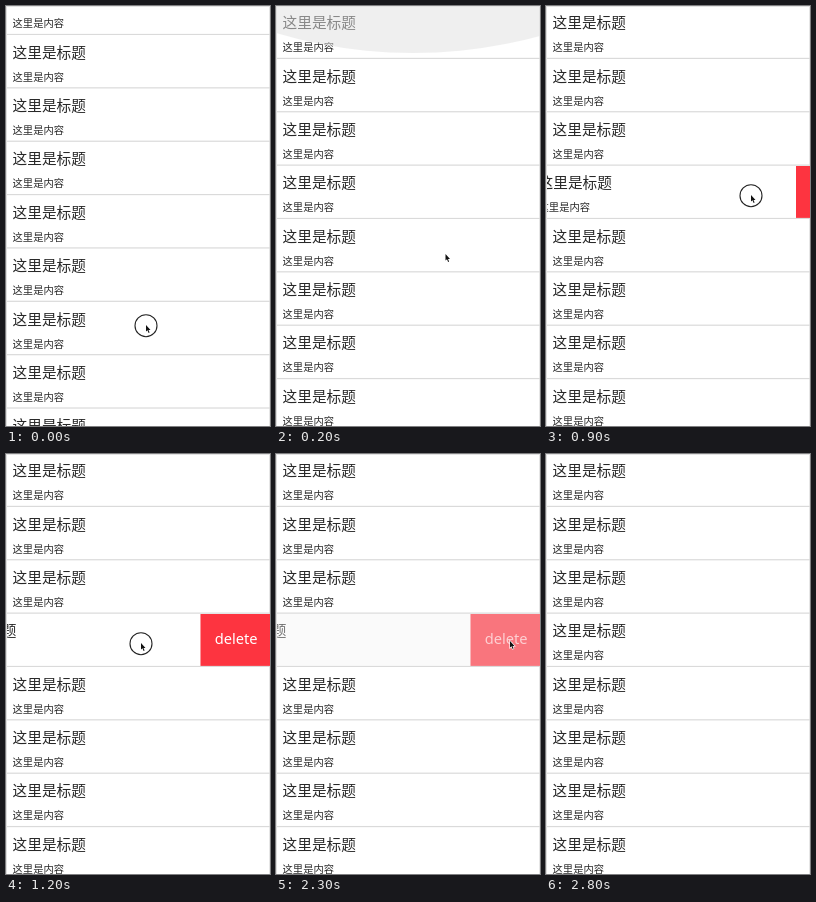
Animation of 264 by 420 pixels, one loop 3 s. Source, as an HTML page with a canvas:

```html
<!DOCTYPE html>
<html lang="zh-CN">
<head>
<meta charset="utf-8">
<style>
  html, body { margin: 0; width: 100%; height: 100%; overflow: hidden; background: #fff; }
  canvas { display: block; }
</style>
</head>
<body>
<canvas id="stage" width="264" height="420"></canvas>
<script>
const W = 264, H = 420, LOOP = 3000, STEP = 100;
const PITCH = 53.36, SWIPED = 3, BUTTON = 69.5;
const CJK = '"Noto Sans CJK SC", "Noto Sans CJK", sans-serif';
const ctx = document.getElementById('stage').getContext('2d');
const arrow = new Path2D('M0 0V6.6L1.5 5.3 2.6 7.9 3.6 7.4 2.5 4.9H4.5Z');

const clamp = (v, lo = 0, hi = 1) => Math.min(hi, Math.max(lo, v));
const smooth = p => (1 - Math.cos(Math.PI * clamp(p))) / 2;
const within = (t, from, to) => t >= from && t < to;

// Pointer path: time, x, y
const pointerPath = [
  [0, 140, 319], [100, 156, 285], [200, 169.5, 248], [400, 198, 212],
  [700, 225, 189], [800, 225, 189], [1000, 185, 189], [1200, 135, 189],
  [1300, 135, 189], [1800, 227, 188], [2200, 234, 187], [2300, 234, 187],
  [2600, 268, 196]
];

function pointerAt(t) {
  const i = pointerPath.findIndex(p => p[0] > t);
  if (i < 0) return null;
  const [a, b] = [pointerPath[i - 1], pointerPath[i]];
  const p = (t - a[0]) / (b[0] - a[0]);
  return { x: a[1] + (b[1] - a[1]) * p, y: a[2] + (b[2] - a[2]) * p };
}

function rect(x, y, w, h, color) {
  ctx.fillStyle = color;
  ctx.fillRect(x, y, w, h);
}

function label(text, x, y, font, color = '#282828') {
  ctx.font = font;
  ctx.fillStyle = color;
  ctx.fillText(text, x, y);
}

function drawRow(y, swipe, alpha) {
  const top = Math.round(y), bottom = Math.round(y + PITCH), edge = W - swipe;
  ctx.globalAlpha = alpha;
  rect(0, top, edge, bottom - top, '#fff');
  label('这里是标题', 6.6 - swipe, y + 22.25, '14.67px ' + CJK);
  label('这里是内容', 6.6 - swipe, y + 45.3, '10.27px ' + CJK);
  if (swipe > 0) {
    rect(edge, top, swipe, bottom - top, '#fd3440');
    label('delete', edge + 14.2, y + 29.8, '14.67px "Noto Sans", sans-serif', '#fff');
  } else {
    rect(W - 1, top, 1, bottom - top, '#e6e6e6');
  }
  ctx.globalAlpha = 1;
  rect(0, y + 51.8, W, 1.2, '#dadada');
}

function drawGlow(t) {
  if (!within(t, 100, 700)) return;
  const strength = t < 200 ? 0.7 : (1 - (t - 200) / 500) ** 2;
  const radius = 480;
  ctx.fillStyle = `rgba(224, 224, 224, ${0.52 * strength})`;
  ctx.beginPath();
  ctx.arc(137, 47 * strength - radius, radius, 0, Math.PI * 2);
  ctx.fill();
}

function drawPointer({ x, y }, pressed) {
  if (pressed) {
    ctx.beginPath();
    ctx.arc(x, y + 0.7, 11, 0, Math.PI * 2);
    ctx.strokeStyle = '#222';
    ctx.lineWidth = 1.1;
    ctx.stroke();
  }
  ctx.save();
  ctx.translate(x, y);
  ctx.strokeStyle = '#fff';
  ctx.lineWidth = 1.2;
  ctx.stroke(arrow);
  ctx.fillStyle = '#111';
  ctx.fill(arrow);
  ctx.restore();
}

function draw(t) {
  const pointer = pointerAt(t);
  const scroll = t < 100 ? 23.9 : 0;
  const swipe = t < 800 ? 0 : t < 1300 ? clamp(225 - pointer.x - 6, 0, BUTTON) : BUTTON;
  const alpha = 1 - smooth((t - 2252) / 120);
  const collapse = smooth((t - 2372) / 250) * PITCH;

  rect(0, 0, W, H, '#f2f2f2');
  if (alpha > 0) drawRow(SWIPED * PITCH - scroll, swipe, alpha);
  for (let i = 0; i < 10; i++) {
    if (i !== SWIPED) drawRow(i * PITCH - scroll - (i > SWIPED ? collapse : 0), 0, 1);
  }
  drawGlow(t);
  rect(0, 0, W, 1, '#e2e2e2');
  rect(0, 0, 1, H, '#dedede');

  const pressed = t < 100 || within(t, 800, 1300) || within(t, 2200, 2300);
  if (pointer) drawPointer(pointer, pressed);
}

function tick() {
  const t = performance.now() % LOOP;
  draw(Math.min(2800, Math.floor(t / STEP) * STEP));
  requestAnimationFrame(tick);
}
tick();
</script>
</body>
</html>
```
